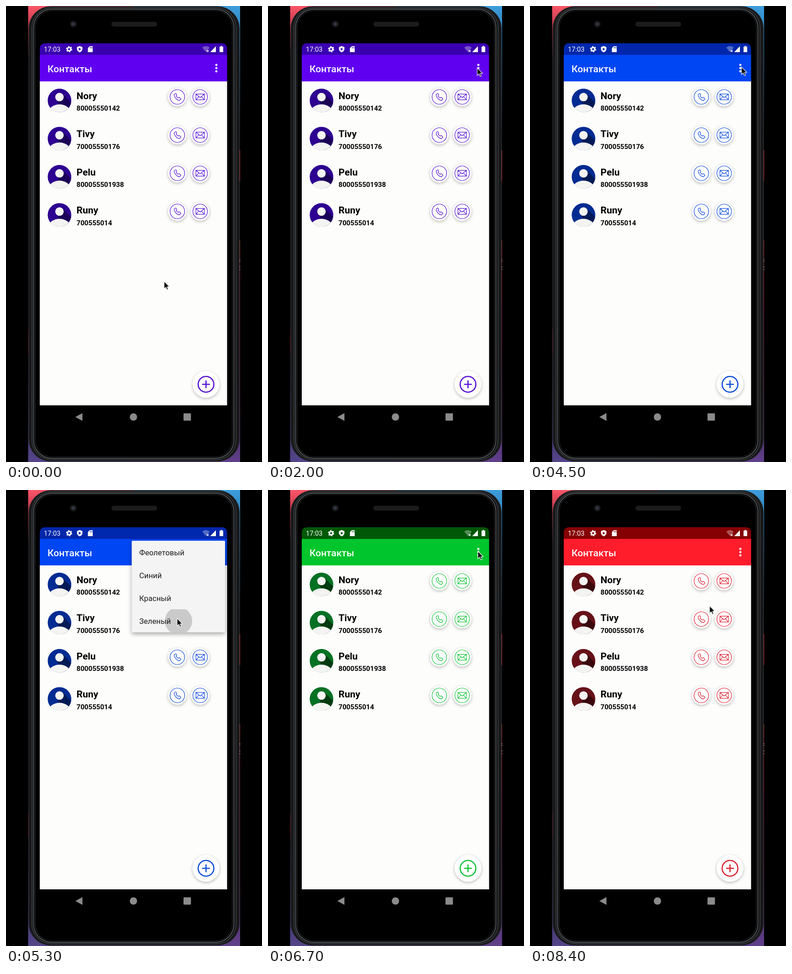
Recreate the animation shown at these times as an HTML page. Size 561 by 998 pixels, loop 8.5 s.

```html
<!DOCTYPE html>
<html lang="ru">
<head>
<meta charset="utf-8">
<title>Контакты</title>
<style>
  html, body { margin: 0; width: 100%; height: 100%; overflow: hidden; background: #000; }
  #stage { display: block; width: 100vw; height: 100vh; font-family: Roboto, "Noto Sans", sans-serif; }
  .bar { fill: var(--bar); }
  .status { fill: var(--status); }
  .avatar { fill: var(--avatar); }
  .shade { fill: var(--shade); }
  .line { fill: none; stroke: var(--icon); stroke-width: 1.2; stroke-linejoin: round; }
  .plus { fill: none; stroke: var(--icon); stroke-width: 2.6; stroke-linecap: round; }
  .raised { fill: #fff; filter: drop-shadow(0 2.5px 3px #0004); }
  .name { font-size: 21px; font-weight: 700; }
  .number { font-size: 15.1px; font-weight: 700; }
  #menu { opacity: 0; font-size: 16.7px; fill: #1c1c1c; }
  #menu .sheet { fill: #f4f4f4; filter: drop-shadow(0 4px 5px #0005); }
</style>
</head>
<body>
<svg id="stage" viewBox="0 0 561 998">
  <defs>
    <linearGradient id="leftEdge" x2="0" y2="1">
      <stop offset="0" stop-color="#fb5668"/><stop offset=".06" stop-color="#a52c40"/>
      <stop offset=".12" stop-color="#151015"/><stop offset=".7" stop-color="#151015"/>
      <stop offset=".72" stop-color="#65122c"/><stop offset=".755" stop-color="#65122c"/>
      <stop offset=".77" stop-color="#1c1526"/><stop offset=".93" stop-color="#3d3468"/>
      <stop offset="1" stop-color="#55458a"/>
    </linearGradient>
    <linearGradient id="rightEdge" x2="0" y2="1">
      <stop offset="0" stop-color="#3d9ddb"/><stop offset=".07" stop-color="#2b78b0"/>
      <stop offset=".25" stop-color="#10202e"/><stop offset=".315" stop-color="#101014"/>
      <stop offset=".317" stop-color="#b83a3c"/><stop offset=".383" stop-color="#a83034"/>
      <stop offset=".385" stop-color="#101012"/><stop offset=".513" stop-color="#101012"/>
      <stop offset=".515" stop-color="#a04434"/><stop offset=".56" stop-color="#7c2028"/>
      <stop offset=".75" stop-color="#5d1034"/><stop offset=".93" stop-color="#4f2e66"/>
      <stop offset="1" stop-color="#60408c"/>
    </linearGradient>
    <clipPath id="face"><circle r="26"/></clipPath>
    <clipPath id="menuRow"><rect x="275.5" y="-25.5" width="204.5" height="50.5"/></clipPath>

    <g id="avatar" clip-path="url(#face)">
      <circle class="avatar" r="26"/>
      <path class="shade" d="M6-15 26 5V26H8L-6-1Z"/>
      <circle cy="-7.5" r="9.3" fill="#f4f4f2"/>
      <ellipse cy="27" rx="24.5" ry="18.5" fill="#f4f4f2"/>
    </g>
    <g id="round"><circle class="raised" r="20.5"/><circle class="line" r="16"/></g>
    <g id="call">
      <use href="#round"/>
      <path class="line" d="M-3.5-7.5-6.5-6C-8.5-3-3 6.5 4.5 7.8L7.5 5Q8 4 7 3L4 1Q3 .8 2 2.3-1.5.8-2.6-2.2-1-3.3-1.5-4.2L-2.5-7Z"/>
    </g>
    <g id="mail">
      <use href="#round"/>
      <path class="line" d="M-9.3-6.3H9.3V6.3H-9.3ZL0 1.5 9.3-6.3M-9.3 6.3-2.8-.8M9.3 6.3 2.8-.8"/>
    </g>
  </defs>

  <rect width="561" height="998"/>
  <rect x="48.5" width="232" height="998" fill="url(#leftEdge)"/>
  <rect x="280" width="233" height="998" fill="url(#rightEdge)"/>
  <path d="M511.5 555h1.5m-1.5 4h1.5m-1.5 12h1.5m-1.5 6h1.5" stroke="#ccc" stroke-width="2"/>

  <g id="phone">
    <rect x="50" y="1" width="461.5" height="995.5" rx="48" fill="#17181a" stroke="#2b2c2e"/>
    <rect x="57" y="4" width="447" height="989" rx="43" fill="#0b0b0c" stroke="#36393b" stroke-width="2"/>
    <rect x="60.5" y="7" width="439" height="983" rx="40" stroke="#505558" stroke-width="2"/>
    <rect x="64" y="10" width="432" height="977" rx="37" stroke="#191a1b" stroke-width="2"/>
    <circle cx="147.5" cy="39.5" r="7" fill="#1c1d20"/>
    <circle cx="147.5" cy="39.5" r="3" fill="#343b48"/>
    <rect x="231" y="34.5" width="100" height="10.5" rx="5" fill="#1c1c1d"/>
    <g fill="#8b8b8b">
      <path d="M152 899.5 167.5 891V908Z"/>
      <circle cx="279.3" cy="899.5" r="8"/>
      <rect x="389" y="891.5" width="16.3" height="16" rx="1.5"/>
    </g>
  </g>

  <path d="M74 165H484.500V874H74Z" fill="#fdfdfc"/>
  <path class="status" d="M74 107.500V94Q74 81.500 86.500 81.500H472Q484.500 81.500 484.500 94V107.500Z"/>
  <rect class="bar" x="74" y="107" width="410.5" height="58"/>

  <g id="statusIcons" fill="#fff">
    <text x="83" y="100" font-size="14.6">17:03</text>
    <g fill="none" stroke="#fff">
      <circle cx="138.300" cy="94.500" r="3.700" stroke-width="3"/>
      <circle cx="138.300" cy="94.500" r="5.800" stroke-width="2" stroke-dasharray="3 3.074"/>
    </g>
    <path d="M161.500 87.500 167.500 90V94Q167.500 99 161.500 101.500 155.500 99 155.500 94V90Z"/>
    <path class="status" d="M159.500 91.300 164.700 94.500 159.500 97.700Z"/>
    <path d="M183.500 88H190V101H179.500V92Z"/>
    <path class="status" d="M183.500 90h1.200v2.500h-1.200zm2.200 0h1.200v2.500h-1.200zm2.200 0h1.200v2.500h-1.200z"/>
    <path d="M430 91Q438 84.500 446.500 91L438.300 101Z" opacity=".32"/>
    <path d="M440 96.500l4 4m0-4-4 4" stroke="#fff" stroke-width="1.300"/>
    <path d="M460 88V101H447.500Z"/>
    <path d="M470.200 87.500H473.800V89H476V101H468V89H470.200Z"/>
  </g>
  <text x="91" y="144.500" font-size="21" font-weight="500" fill="#fff">Контакты</text>
  <g fill="#fff">
    <circle cx="461" cy="129" r="2.400"/><circle cx="461" cy="136" r="2.400"/><circle cx="461" cy="143" r="2.400"/>
  </g>

  <g id="contacts"></g>

  <g transform="translate(438.300 828)">
    <circle class="raised" r="29.500"/>
    <circle class="plus" r="17.200"/>
    <path class="plus" d="M-7.500 0H7.500M0-7.500V7.500"/>
  </g>

  <g id="menu">
    <rect class="sheet" x="275.500" y="111" width="204.500" height="200.500" rx="2"/>
    <g id="ripple" clip-path="url(#menuRow)"><circle id="wave" cx="378" r="0" fill="#cacaca"/></g>
    <text x="292" y="142.500">Феолетовый</text>
    <text x="292" y="192.500">Синий</text>
    <text x="292" y="242.500">Красный</text>
    <text x="292" y="292.500">Зеленый</text>
  </g>

  <path id="cursor" d="M0 0V16.500L3.800 13 6.300 18.800 9 17.600 6.500 12H11.700Z" stroke="#fff" stroke-width="1.100"/>
</svg>

<script>
const LOOP = 8500, TICK = 100;
const $ = id => document.getElementById(id);

const contacts = [
  ['Nory', '80005550142'],
  ['Tivy', '70005550176'],
  ['Pelu', '800055501938'],
  ['Runy', '700555014'],
];
$('contacts').innerHTML = contacts.map(([name, number], i) => `
  <g transform="translate(0 ${i * 83.5})">
    <use href="#avatar" x="117.200" y="206.800"/>
    <text class="name" x="154.500" y="203.700">${name}</text>
    <text class="number" x="154.500" y="229">${number}</text>
    <use href="#call" x="375.500" y="199"/>
    <use href="#mail" x="425.500" y="199"/>
  </g>`).join('');

// Plays [ms, style] pairs as hard changes.
function track(element, steps) {
  const frames = steps.map(([ms, style]) =>
    ({ offset: Math.max(0, ms - 1) / LOOP, easing: 'step-end', ...style }));
  frames.push({ ...frames.at(-1), offset: 1 });
  element.animate(frames, { duration: LOOP, iterations: Infinity });
}

const theme = (bar, status, avatar, shade, icon) => ({
  '--bar': bar, '--status': status, '--avatar': avatar, '--shade': shade, '--icon': icon,
});
track($('stage'), [
  [0, theme('#6000f0', '#3900b0', '#2d0091', '#1b0058', '#5410d2')],
  [3600, theme('#0046f3', '#0027ab', '#002b92', '#001a56', '#0c4bd8')],
  [5600, theme('#00c52c', '#005806', '#047123', '#003a11', '#12c437')],
  [8000, theme('#ff1c2b', '#850003', '#661118', '#3a080c', '#dc1f2f')],
]);

// Each choice: menu opens, the row is pressed, menu closes.
const choices = [
  { open: 2300, press: 3300, row: 186 },
  { open: 4700, press: 5300, row: 286.5 },
  { open: 6900, press: 7700, row: 236.5 },
];
track($('menu'), [[0, { opacity: 0 }], ...choices.flatMap(({ open, press }) => [
  [open, { opacity: .5 }],
  [open + 100, { opacity: 1 }],
  [press + 200, { opacity: .5 }],
  [press + 300, { opacity: 0 }],
])]);
track($('wave'), [[0, { r: '0px' }], ...choices.flatMap(({ press }) => [
  [press, { r: '30px' }],
  [press + 100, { r: '61px' }],
  [press + 200, { r: '106px' }],
  [press + 300, { r: '0px' }],
])]);
track($('ripple'), [
  [0, { transform: `translate(0px, ${choices[0].row}px)` }],
  ...choices.map(({ open, row }) => [open, { transform: `translate(0px, ${row}px)` }]),
]);

const path = [
  [0, 346.5, 602.5], [600, 346.5, 602.5], [1700, 458.5, 135.5], [2400, 458.5, 135.5],
  [3100, 339.5, 185.5], [3600, 339.5, 185.5], [4400, 463.5, 133.5], [4700, 463.5, 133.5],
  [5200, 375, 281], [5500, 375, 281], [5800, 390.5, 216.5], [6200, 390.5, 216.5],
  [6700, 460, 134], [7000, 460, 134], [7500, 363.5, 235], [8000, 363.5, 235], [8400, 393.5, 253.5],
];
const ease = u => u * u * (3 - 2 * u);
function cursorAt(ms) {
  const next = path.findIndex(point => point[0] > ms);
  const [t0, x0, y0] = path.at(next < 0 ? -1 : next - 1);
  const [t1, x1, y1] = path.at(next);
  const k = next < 0 ? 0 : ease((ms - t0) / (t1 - t0));
  return `translate(${x0 + (x1 - x0) * k}px, ${y0 + (y1 - y0) * k}px)`;
}
track($('cursor'), Array.from({ length: LOOP / TICK }, (_, i) =>
  [i * TICK, { transform: cursorAt(i * TICK) }]));
</script>
</body>
</html>
```
